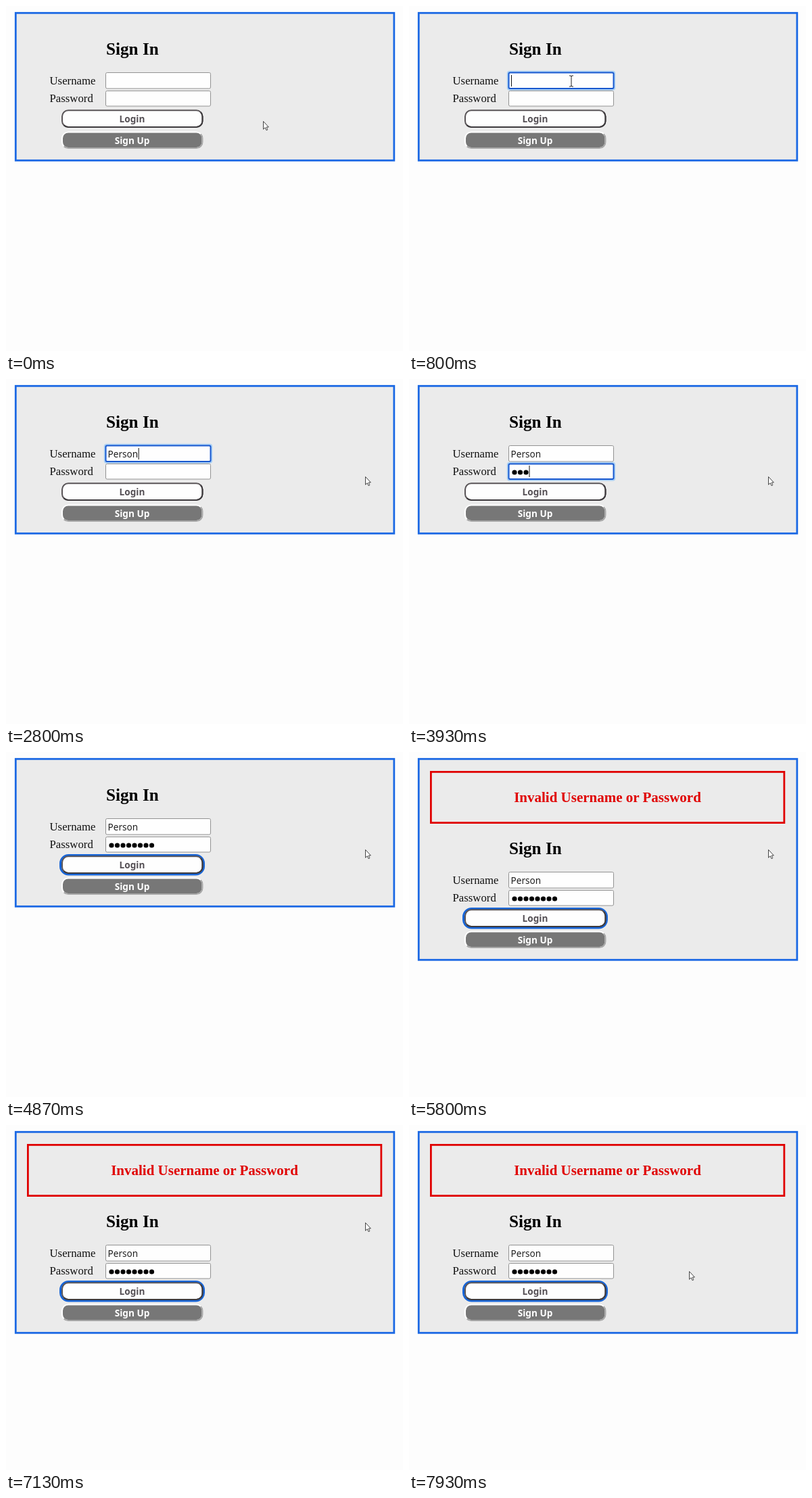
Write an HTML page that moves like this. It is 587 px wide and 510 px high and loops after 8 s.

```html
<!DOCTYPE html>
<html lang="en">
<head>
<meta charset="utf-8">
<title>Sign in form</title>
<style>
html, body { margin: 0; width: 100%; height: 100%; overflow: hidden; background: #fdfdfd; }
svg { display: block; width: 587px; height: 510px; }
.serif { font-family: "Liberation Serif", "Times New Roman", serif; font-size: 16.8px; fill: #111; }
.head { font-size: 25.2px; font-weight: bold; fill: #000; }
.alert { font-size: 21px; font-weight: bold; fill: #e00000; text-anchor: middle; }
.sans { font-family: "Noto Sans", "Open Sans", sans-serif; font-size: 13.6px; fill: #222; }
.btn { font-weight: bold; text-anchor: middle; }
</style>
</head>
<body>
<svg viewBox="0 0 587 510">
  <rect id="panel" x="14.3" y="10.3" width="559.5" height="218" fill="#ebebeb" stroke="#1c69e4" stroke-width="2.8"/>
  <g id="error">
    <rect x="32.4" y="29.4" width="522.4" height="75.2" fill="none" stroke="#e00000" stroke-width="2.8"/>
    <text class="serif alert" x="293.5" y="74">Invalid Username or Password</text>
  </g>
  <g id="form">
    <text class="serif head" x="148" y="71.5">Sign In</text>
    <text class="serif" x="64.5" y="116">Username</text>
    <text class="serif" x="64.5" y="142">Password</text>
    <g id="boxes"></g>
    <text id="user" class="sans" x="150.5" y="116"></text>
    <g id="dots" fill="#000"></g>
    <rect id="caret" width="1" height="17" fill="#111"/>
    <rect id="ring" x="80.5" y="152.5" width="212" height="28.5" rx="12" fill="none" stroke="#1765d8" stroke-width="3"/>
    <g id="buttons"></g>
    <text class="sans btn" x="186.5" y="172" style="fill:#555055">Login</text>
    <text class="sans btn" x="186.5" y="203.7" style="fill:#fff">Sign Up</text>
  </g>
  <path id="arrow" d="M.5 .5V12.2L3.2 9.7L5 13.7L6.8 12.9L5.1 9H8.4Z" fill="#fff" stroke="#444" stroke-width="1"/>
  <path id="beam" d="M-3 -8H-1L0 -7L1 -8H3M0 -7V7M-3 8H-1L0 7L1 8H3" fill="none" stroke="#222" stroke-width="1"/>
</svg>
<script>
const LOOP = 8000, NAME = "Person", SHIFT = 79, DOT_GAP = 8.5;
const CLICK = 750, TAB_PASS = 3200, TAB_LOGIN = 4770, ENTER = 5400;
const nameKeys = { start: 1900, step: 150, count: NAME.length };
const passKeys = { start: 3540, step: 150, count: 8 };
const $ = id => document.getElementById(id);

function add(parent, tag, attrs) {
  const el = document.createElementNS("http://www.w3.org/2000/svg", tag);
  for (const key in attrs) el.setAttribute(key, attrs[key]);
  return parent.appendChild(el);
}

function show(el, on) { el.style.display = on ? "" : "none"; }

function field(y, height) {
  const g = $("boxes");
  const halo = add(g, "rect", { x: 144.8, y: y - 2.2, width: 160.4, height: height + 5.4, rx: 4, fill: "#a9d0f5" });
  const box = add(g, "rect", { x: 147.5, y: y + .5, width: 155, height, rx: 2, fill: "#fefefe" });
  return on => {
    show(halo, on);
    box.setAttribute("stroke", on ? "#1858cf" : "#929292");
    box.setAttribute("stroke-width", on ? 2 : 1);
  };
}

// Button with a light top-left and a dark bottom-right edge
function button(y, h, fill, light, dark) {
  const x = 83, w = 207.5, r = 9, k = r * (1 - Math.SQRT1_2);
  const g = $("buttons"), arc = `A${r} ${r} 0 0 0 `;
  add(g, "rect", { x, y, width: w, height: h, rx: r, fill, stroke: light, "stroke-width": 2 });
  add(g, "path", {
    d: `M${x + k} ${y + h - k}${arc}${x + r} ${y + h}H${x + w - r}${arc}${x + w} ${y + h - r}V${y + r}${arc}${x + w - k} ${y + k}`,
    fill: "none", stroke: dark, "stroke-width": 2
  });
}

const focusUser = field(98, 23.5), focusPass = field(125, 22.5);
button(154.3, 24.6, "#fefefe", "#5a5558", "#3d3a3d");
button(186.5, 23.6, "#777", "#fff", "#a6a6a6");
for (let i = 0; i < passKeys.count; i++)
  add($("dots"), "circle", { cx: 156 + i * DOT_GAP, cy: 138, r: 3.6 });

function typed(keys, t) {
  return Math.max(0, Math.min(keys.count, Math.floor((t - keys.start) / keys.step) + 1));
}

function lastKey(keys, t, focused) {
  const n = typed(keys, t);
  return n ? keys.start + (n - 1) * keys.step : focused;
}

// Pointer stops: time, x, y
const stops = [[80, 380, 170], [580, 240, 111], [930, 240, 111], [1500, 531, 144],
  [7200, 531, 144], [7930, 414, 216]];

function pointer(t) {
  let i = 0;
  while (i < stops.length - 2 && t > stops[i + 1][0]) i++;
  const [t0, x0, y0] = stops[i], [t1, x1, y1] = stops[i + 1];
  const p = Math.max(0, Math.min(1, (t - t0) / (t1 - t0)));
  const e = p * p * (3 - 2 * p);
  return [x0 + (x1 - x0) * e, y0 + (y1 - y0) * e];
}

function draw(t) {
  const failed = t >= ENTER;
  const inUser = t >= CLICK && t < TAB_PASS, inPass = t >= TAB_PASS && t < TAB_LOGIN;
  show($("error"), failed);
  $("panel").setAttribute("height", 218 + (failed ? SHIFT : 0));
  $("form").setAttribute("transform", `translate(0 ${failed ? SHIFT : 0})`);
  focusUser(inUser);
  focusPass(inPass);
  show($("ring"), t >= TAB_LOGIN);

  $("user").textContent = NAME.slice(0, typed(nameKeys, t));
  const count = typed(passKeys, t);
  [...$("dots").children].forEach((dot, i) => show(dot, i < count));

  const since = t - (inUser ? lastKey(nameKeys, t, CLICK) : lastKey(passKeys, t, TAB_PASS));
  show($("caret"), (inUser || inPass) && since % 1000 < 500);
  $("caret").setAttribute("x", inUser ? 151 + $("user").getComputedTextLength() : 152 + count * DOT_GAP);
  $("caret").setAttribute("y", inUser ? 102 : 128);

  const [x, y] = pointer(t);
  const overField = !failed && x > 147 && x < 303 && y > 98 && y < 148;
  show($("arrow"), !overField);
  show($("beam"), overField);
  for (const id of ["arrow", "beam"]) $(id).setAttribute("transform", `translate(${x} ${y})`);
}

function tick() {
  draw(performance.now() % LOOP);
  requestAnimationFrame(tick);
}
tick();
</script>
</body>
</html>
```
